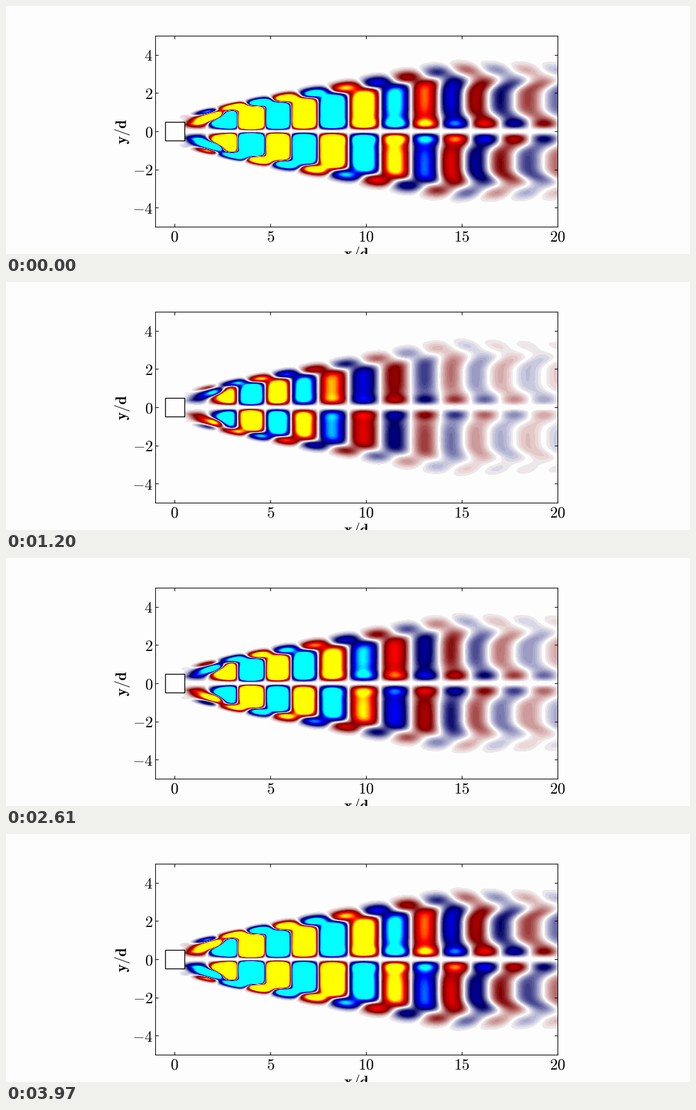
A matplotlib script that plays this animation: 1100x400 px, repeating every 4010 ms.

```python
import numpy as np
import matplotlib.pyplot as plt
from matplotlib.animation import FuncAnimation
from matplotlib.colors import LinearSegmentedColormap
from matplotlib.patches import Rectangle

plt.rcParams.update({"mathtext.fontset": "cm", "font.size": 18})

PAPER = "#fdfdfd"
STEP = 0.02          # contour spacing
HALF = 50            # contour bands on each side of zero
STATES = 100         # phases sampled over one full oscillation
TICK = 10            # ms per drawn frame
FRAMES = 401


def ease(v, a, b):
    """Smooth step from 0 at a to 1 at b."""
    u = np.clip((v - a) / (b - a), 0, 1)
    return u * u * (3 - 2 * u)


def bump(v, centre, width, power=2):
    return np.exp(-np.abs((v - centre) / width) ** power)


def wave(x):
    """Alternating cells, slightly shorter close to the body."""
    u = (x - 5.5) / 2.4
    return np.cos(np.pi * (.645 * x - .48 + .24 * u * np.exp(-u * u / 2)))


def build_mode():
    """Antisymmetric wake mode: rows of cells, each lagging on its own."""
    x, y = np.meshgrid(np.linspace(-1, 20, 647), np.linspace(-5, 5, 308))
    h = np.abs(y)
    near = 1 - ease(x, 2, 3.4)
    far = np.clip(x, 0, 13)

    rise = np.maximum(x, .05) ** 2
    fall = 26.8 * np.exp(-.28 * x) + .1
    amp = 1 / np.hypot(1 / rise, 1 / fall)

    # main row, with a waist that leans upstream far downstream
    mid = np.clip(.03 + .147 * x, .25, 2)
    bend = np.minimum(.5 + .155 * x, 2.75)
    width = np.where(h > mid, bend - mid + .1 - .3 * near, .8 * mid)
    waist = .85 * ease(x, 12.5, 18.5) * bump(h, 1.6, .85, 4)
    field = bump(h, mid, width, 4) * wave(x + waist)

    # row along the axis
    field += 1.3 * ease(x, 3, 17) * bump(h, .38, .28) * wave(x)

    # outer tails, swept back
    top = bend + .2 + .02 * far
    sweep = .9 + .8 * (h - top)
    field += .43 * bump(h, top, .1 + .02 * far) * wave(x + sweep)

    # slanted row leaving the body's corners
    lag = .9 * ease(x, .8, 2)
    field += near * bump(h, .2 + .29 * x, .22) * wave(x - lag)

    gap = .16 + .25 * near
    return np.sign(y) * amp * field * (1 - bump(h, 0, gap))


def build_palette():
    cmap = LinearSegmentedColormap.from_list("wake", [
        (0, 1, 1), (0, 0, 1), (0, 0, .4), (1, 1, 1),
        (.5, 0, 0), (1, 0, 0), (1, 1, 0)], N=1200)
    rgb = cmap(np.linspace(0, 1, 2 * HALF))[:, :3] * 255
    rgb[HALF - 1:HALF + 1] = 253
    rgb[[HALF - 2, HALF + 1]] = (237, 231, 234)
    return rgb.round().astype(np.uint8)


mode = build_mode()
palette = build_palette()


def picture(n):
    k = (n - (n >= 200)) // 4
    field = mode * np.cos(2 * np.pi * k / (STATES - 1))
    band = np.floor(field / STEP).astype(int) + HALF
    return palette[np.clip(band, 0, 2 * HALF - 1)]


fig, ax = plt.subplots(figsize=(11, 4), dpi=100, facecolor=PAPER)
ax.set_facecolor(PAPER)
image = ax.imshow(picture(0), extent=(-1, 20, -5, 5), origin="lower",
                  interpolation="nearest")
ax.add_patch(Rectangle((-.5, -.5), 1, 1, fc=PAPER, ec="black", lw=1, zorder=3))
ax.set(xlim=(-1, 20), ylim=(-5, 5), aspect="equal")
ax.tick_params(direction="in", top=True, right=True, pad=3)
ticks_x, ticks_y = range(0, 21, 5), range(-4, 5, 2)
ax.set_xticks(ticks_x, [f"${v}$" for v in ticks_x])
ax.set_yticks(ticks_y, [f"${v}$" for v in ticks_y])
ax.set_xlabel(r"$\mathbf{x/d}$", labelpad=1)
ax.set_ylabel(r"$\mathbf{y/d}$", labelpad=1)


def update(n):
    image.set_data(picture(n))
    return (image,)


anim = FuncAnimation(fig, update, frames=FRAMES, interval=TICK, repeat=True,
                     repeat_delay=0)
plt.show()
```
